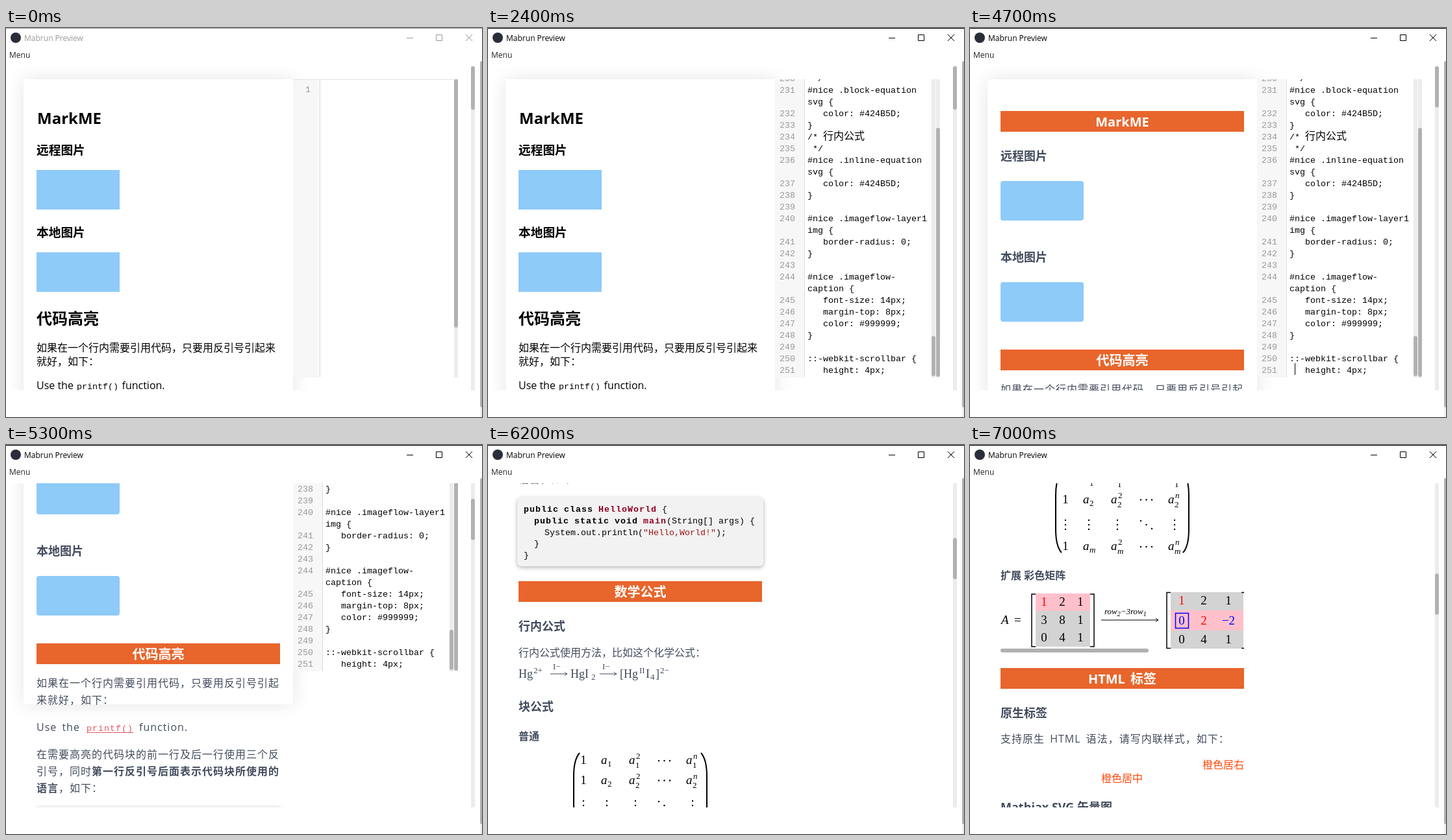
Animation, 733 px wide and 600 px high, one loop 7.7 s. Source, as an HTML page:

```html
<!DOCTYPE html>
<html lang="zh-CN">
<head>
<meta charset="utf-8">
<style>
html, body { margin: 0; width: 100%; height: 100%; overflow: hidden; background: #fff; }
svg { display: block; }
text { white-space: pre; font: 16px 'Open Sans', 'Noto Sans CJK SC', 'Noto Sans CJK', sans-serif; }
.ui { font-size: 12px; }
.h1 { font-size: 24px; font-weight: bold; }
.h3 { font-size: 18.72px; font-weight: bold; }
.styled text { fill: #424b5d; }
.styled .bar { font-size: 20px; font-weight: bold; fill: #fff; text-anchor: middle; word-spacing: 3px; }
.styled .sub { font-size: 18px; font-weight: bold; }
.styled .small { font-weight: bold; }
.styled .p { letter-spacing: 1px; word-spacing: 3px; }
.styled .orange { fill: #ff4a0a; }
text.mono { font: 13.333px 'Liberation Mono', 'Noto Sans CJK SC', monospace; }
.mono .wide { font-size: 16px; }
.num { fill: #999; }
.styled .link { fill: #e2565f; letter-spacing: 1px; }
.styled .java { fill: #000; }
.java b, .java .b { font-weight: bold; letter-spacing: 1px; }
.java .name { fill: #900020; }
.java .str { fill: #a01515; }
.styled .tex { font: 18px 'Liberation Serif', serif; }
.styled .script { font-size: 13px; }
.styled .black { fill: #000; font-size: 19px; }
.styled .black.script { font-size: 13px; }
.styled .it { font-style: italic; }
.styled .mid { text-anchor: middle; }
.styled .red { fill: #f00; }
.styled .blue { fill: #00f; }
</style>
</head>
<body>
<svg id="stage" width="733" height="600" viewBox="0 0 733 600"></svg>
<script>
const LOOP = 7700, ORANGE = '#e8652c', THUMB = '#b1b1b1', TRACK = '#ececec';

const text = (x, y, s, cls = '') => `<text x="${x}" y="${y}" class="${cls}">${s}</text>`;
const rect = (x, y, w, h, fill, extra = '') =>
  `<rect x="${x}" y="${y}" width="${w}" height="${h}" fill="${fill}" ${extra}/>`;
const path = (d, color = '#000', width = 1) =>
  `<path d="${d}" fill="none" stroke="${color}" stroke-width="${width}"/>`;
const group = (id, body, extra = '') => `<g id="${id}" ${extra}>${body}</g>`;
const logo = (y, r = 0) => rect(47, y, 128, 61, '#8ecbf9', `rx="${r}"`);
const bar = (y, s) => rect(47, y, 375, 32, ORANGE) + text(234.5, y + 24, s, 'bar');
const scrollbar = (x, y, h, from, size) =>
  rect(x, y, 6, h, TRACK) + rect(x, from, 6, size, THUMB, 'rx="3"');
const arrow = (x1, x2, y, color) =>
  path(`M${x1} ${y}H${x2}M${x2 - 4} ${y - 3}Q${x2 - 3} ${y - 1} ${x2} ${y}Q${x2 - 3} ${y + 1} ${x2 - 4} ${y + 3}`, color);

function plainArticle() {
  return text(48, 148, 'MarkME', 'h1') +
    text(47, 195, '远程图片', 'h3') + logo(219) +
    text(47, 322, '本地图片', 'h3') + logo(346) +
    text(47, 457, '代码高亮', 'h1') +
    text(47, 499, '如果在一个行内需要引用代码，只要用反引号引起来') +
    text(47, 520, '就好，如下：') +
    text(47, 557, 'Use the') + text(109, 557, 'printf()', 'mono') + text(178.5, 557, 'function.');
}

function javaBlock() {
  const b = (s, cls = '') => `<tspan class="b ${cls}">${s}</tspan>`;
  const lines = [
    `${b('public')} ${b('class')} ${b('HelloWorld', 'name')} {`,
    `  ${b('public')} ${b('static')} ${b('void')} ${b('main', 'name')}(String[] args) {`,
    `    System.out.println(<tspan class="str">"Hello,World!"</tspan>);`,
    '  }', '}'];
  return rect(45, 748, 379, 106, '#f2f2f2', 'rx="6" style="filter:drop-shadow(0 2px 3px rgba(0,0,0,.3))"') +
    lines.map((s, i) => text(55, 770 + i * 17.8, s, 'mono java')).join('');
}

function chemistry() {
  const y = 1026, roman = (x, s) => text(x, y, s, 'tex');
  const small = (x, dy, s) => text(x, y + dy, s, 'tex script');
  return roman(47, 'Hg') + small(70, -7, '2+') + arrow(96, 122, y - 6, '#424b5d') + small(100, -13, 'I−') +
    roman(127, 'HgI') + small(159, 3, '2') + arrow(172, 198, y - 6, '#424b5d') + small(176, -13, 'I−') +
    roman(203, '[Hg') + small(233, -7, 'II') + roman(243, 'I') + small(250, 3, '4') +
    roman(258, ']') + small(265, -7, '2−');
}

function vandermonde() {
  const dot = (x, y) => `<circle cx="${x}" cy="${y}" r="1.2"/>`;
  const dots = (x, y, dx, dy) => [-1, 0, 1].map(k => dot(x + k * dx, y + k * dy)).join('');
  const small = (x, y, s, it) => text(x, y, s, 'tex black script ' + it);
  const row = (y, index) => {
    const it = index === 'm' ? 'it' : '';
    const a = x => text(x, y, 'a', 'tex black it');
    return text(147, y, '1', 'tex black mid') +
      a(174) + small(184, y + 4, index, it) +
      a(217) + small(228, y - 8, '2', '') + small(227, y + 6, index, it) +
      dots(271.5, y - 5, 8.5, 0) +
      a(305) + small(316, y - 8, 'n', 'it') + small(315, y + 6, index, it);
  };
  const paren = (x, dir) => path(`M${x} 1142q${-9 * dir} 10 ${-9 * dir} 36v52q0 26 ${9 * dir} 36`, '#000', 2);
  return paren(141, 1) + paren(328, -1) + row(1159, '1') + row(1189.5, '2') + row(1262, 'm') +
    [147, 183, 227, 315].map(x => dots(x, 1223, 0, 7)).join('') + dots(271.5, 1223, 8.5, 6);
}

function cells(xs, ys, pinkRow, values, baselines) {
  let out = '';
  values.forEach((line, r) => line.forEach(([s, color = ''], c) => {
    out += rect(xs[c], ys[r], xs[c + 1] - xs[c], ys[r + 1] - ys[r], r === pinkRow ? '#ffc0cb' : '#d3d3d3') +
      text((xs[c] + xs[c + 1]) / 2 - 1, baselines[r], s, 'tex black mid ' + color);
  }));
  return out;
}

function colourMatrix() {
  const left = cells([101, 129, 157, 185], [1329, 1356, 1383, 1411], 0,
    [[['1', 'red'], ['2'], ['1']], [['3'], ['8'], ['1']], [['0'], ['4'], ['1']]], [1348, 1376, 1403]);
  const right = cells([309, 345, 377, 421], [1327, 1355, 1386, 1414], 1,
    [[['1', 'red'], ['2'], ['1']], [['0', 'blue'], ['2', 'red'], ['−2', 'blue']], [['0'], ['4'], ['1']]],
    [1346, 1377, 1406]);
  return text(48, 1376, 'A', 'tex black it') + text(68, 1376, '=', 'tex black') + left +
    path('M101 1330H95V1411H101M185 1330H191V1411H185', '#000', 1.5) +
    text(207, 1361, 'row<tspan dy="3" font-size="10">2</tspan><tspan dy="-3">−3row</tspan><tspan dy="3" font-size="10">1</tspan>', 'tex black script it') +
    arrow(202, 290, 1370, '#000') + right +
    path('M309 1327.5H303V1413.5H309M418 1327.5H422M418 1413.5H422', '#000', 1.5) +
    path('M316.5 1359.5h20v23h-20z', '#00f', 1.5) +
    rect(47, 1414, 228, 6, THUMB, 'rx="3"');
}

function styledArticle() {
  return bar(128, 'MarkME') +
    text(47, 204, '远程图片', 'sub') + logo(236, 4) +
    text(47, 360, '本地图片', 'sub') + logo(392, 4) +
    bar(496, '代码高亮') +
    text(47, 563, '如果在一个行内需要引用代码，只要用反引号引起', 'p') +
    text(47, 589, '来就好，如下：', 'p') +
    text(47, 631, 'Use the', 'p') + text(124, 631, 'printf()', 'mono link') + rect(124, 633, 72, 1, '#e2565f') +
    text(205, 631, 'function.', 'p') +
    text(47, 673, '在需要高亮的代码块的前一行及后一行使用三个反', 'p') +
    text(47, 699, '引号，同时<tspan font-weight="bold">第一行反引号后面表示代码块所使用的</tspan>', 'p') +
    text(47, 725, '<tspan font-weight="bold">语言</tspan>，如下：', 'p') +
    javaBlock() + bar(877, '数学公式') +
    text(47, 953, '行内公式', 'sub') +
    text(47, 993, '行内公式使用方法，比如这个化学公式：') + chemistry() +
    text(47, 1077, '块公式', 'sub') + text(47, 1122, '普通', 'small') + vandermonde() +
    text(47, 1307, '扩展 彩色矩阵', 'small') + colourMatrix() +
    bar(1444, 'HTML 标签') +
    text(47, 1520, '原生标签', 'sub') +
    text(47, 1559, '支持原生 HTML 语法，请写内联样式，如下：', 'p') +
    text(358, 1599, '橙色居右', 'orange') + text(202, 1620, '橙色居中', 'orange') +
    text(47, 1665, 'Mathjax SVG 矢量图', 'sub');
}

function emptyEditor() {
  return rect(442, 79, 254, 460, '#fff') + rect(442, 79, 41, 460, '#f7f7f7') + rect(483, 79, 1, 460, '#ddd') +
    rect(442, 79, 248, 1, '#e3e3e3') + text(461, 99, '1', 'mono num') + scrollbar(690, 79, 460, 79, 383);
}

// Lines starting with "~" are soft wraps and carry no number.
const CSS_LINES = ` */
#nice .block-equation
~svg {
   color: #424B5D;
}
/* <tspan class="wide">行内公式</tspan>
 */
#nice .inline-equation
~svg {
   color: #424B5D;
}

#nice .imageflow-layer1
~img {
   border-radius: 0;
}

#nice .imageflow-
~caption {
   font-size: 14px;
   margin-top: 8px;
   color: #999999;
}

::-webkit-scrollbar {
   height: 4px;
}`.split('\n');

function filledEditor() {
  let number = 230;
  const lines = CSS_LINES.map((line, i) => {
    const y = 82 + i * 18, wrapped = line[0] === '~';
    return (wrapped ? '' : text(449, y, number++, 'mono num')) + text(492, y, line.replace('~', ''), 'mono');
  }).join('');
  return rect(442, 79, 254, 460, '#fff') + rect(442, 79, 45, 460, '#f7f7f7') + rect(487, 79, 1, 460, '#ddd') +
    `<g clip-path="url(#code)">${lines}</g>` +
    scrollbar(683, 79, 460, 475, 62) + scrollbar(690, 79, 460, 154, 384);
}

function menu() {
  return rect(-2, 50.5, 260, 79, '#fff', 'stroke="#ccc" style="filter:drop-shadow(2px 2px 1px rgba(0,0,0,.4))"') +
    rect(0, 54, 257, 24, '#e6e6e6', 'id="hover"') +
    text(24, 71, 'Copy HTML', 'ui') + text(24, 95, 'Apply Custom Style', 'ui') +
    text(24, 119, 'Toggle Developer Tools', 'ui') + text(166, 119, 'Ctrl+Shift+I', 'ui" fill="#777');
}

const $ = id => document.getElementById(id);
$('stage').innerHTML =
  `<clipPath id="view">${rect(7, 59, 715, 500, '#000')}</clipPath>
   <clipPath id="code">${rect(442, 79, 241, 460, '#000')}</clipPath>` +
  rect(0, 0, 733, 600, '#fff') +
  group('frame', rect(0, 0, 733, 1, 'currentColor') + text(28, 20, 'Mabrun Preview', 'ui" fill="currentColor') +
    path('M617 15.5h10M662.5 10.5h9v9h-9zM708 10l10 10m0-10l-10 10', 'currentColor')) +
  '<circle cx="15" cy="15" r="8" fill="#2b2e3a"/>' +
  rect(0, 31, 45, 20, '#e0e0e0', 'id="label"') + text(5, 46, 'Menu', 'ui" fill="#222') +
  `<g clip-path="url(#view)">` +
    group('page',
      rect(27, 79, 415, 511, '#000', 'opacity=".1" style="filter:blur(15px)"') + rect(27, 79, 415, 511, '#fff') +
      group('plain', plainArticle()) + group('styled', styledArticle(), 'class="styled"') +
      group('empty', emptyEditor()) + group('filled', filledEditor()) +
      rect(0, 0, 1, 18, '#000', 'id="caret"')) +
    rect(716, 59, 6, 500, TRACK) + rect(716, 59, 6, 67, THUMB, 'id="thumb" rx="3"') + '</g>' +
  rect(730, 51, 6, 549, '#f0f0f0') + rect(730, 51, 6, 534, THUMB, 'rx="3"') +
  group('menu', menu());

const CARET_TOGGLES = [600, 1100, 1500, 2400, 2800, 3200, 3900, 4300, 4700, 5200];
const MENU_OPACITY = [[0, 0], [3300, .6], [3400, 1], [3800, .4], [3900, .1], [4000, 0]];
const SCROLL = [[0, 0], [5200, 40], [5300, 190], [5400, 300], [5600, 315], [5700, 440], [5800, 560], [5900, 600],
  [6100, 617], [6200, 667], [6300, 770], [6400, 880], [6500, 965], [6600, 1000], [6800, 1020], [6900, 1080], [7000, 1100]];

const valueAt = (steps, t) => steps.filter(([time]) => time <= t).pop()[1];
const show = (id, on) => $(id).style.display = on ? '' : 'none';

function draw(t) {
  const pasted = t >= 1900, styled = t >= 3900, scroll = valueAt(SCROLL, t);
  $('frame').style.color = t < 600 ? '#999' : '#000';
  show('plain', !styled);
  show('styled', styled);
  show('empty', !pasted);
  show('filled', pasted);
  show('caret', CARET_TOGGLES.filter(time => time <= t).length % 2);
  $('caret').setAttribute('transform', pasted ? 'translate(500 517)' : 'translate(488 84)');
  show('label', t >= 3200 && t < 4300);
  $('menu').style.opacity = valueAt(MENU_OPACITY, t);
  show('hover', t >= 3400);
  $('hover').setAttribute('y', t < 3500 ? 54 : 78);
  $('page').setAttribute('transform', `translate(0 ${-scroll})`);
  $('thumb').setAttribute('y', 59 + scroll * .1265);
  $('thumb').setAttribute('height', styled ? 63.5 : 67);
}

const start = performance.now();
function tick() {
  draw((performance.now() - start) % LOOP);
  requestAnimationFrame(tick);
}
tick();
</script>
</body>
</html>
```
